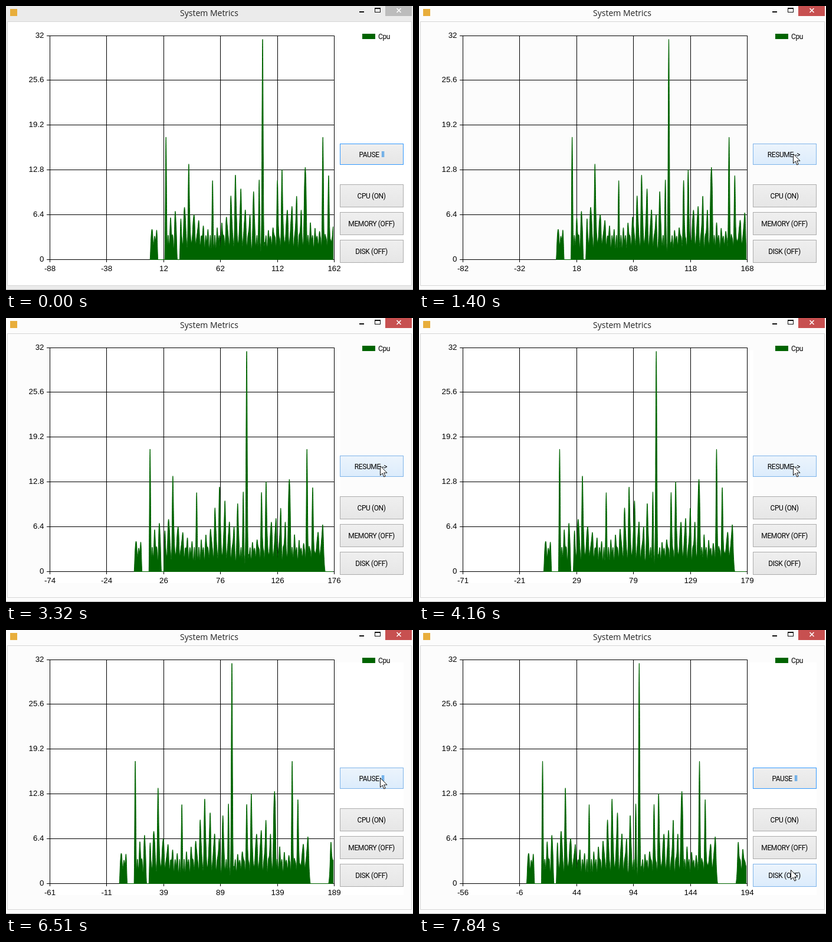
An HTML page for the animation above (7.99 s loop, 690x481 px).

```html
<!DOCTYPE html>
<html lang="en">
<head>
<meta charset="utf-8">
<title>System Metrics</title>
<style>
  html, body { margin: 0; width: 100%; height: 100%; overflow: hidden; background: #fcfcfc; }
  svg { display: block; width: 690px; height: 481px; }
  text { fill: #000; }
  .title { font: 14px "Open Sans", "Noto Sans", sans-serif; fill: #222; }
  .axis text { font: 13.3px "Liberation Sans", Arial, sans-serif; }
  .ui { font: 12px Roboto, "Liberation Sans", sans-serif; letter-spacing: -.4px; }
  .grid { stroke: #000; fill: none; shape-rendering: crispEdges; }
  rect { shape-rendering: crispEdges; }
</style>
</head>
<body>
<svg id="stage" viewBox="0 0 690 481">
  <defs>
    <linearGradient id="normal" x2="0" y2="1"><stop stop-color="#efefef"/><stop offset="1" stop-color="#e6e6e6"/></linearGradient>
    <linearGradient id="hover" x2="0" y2="1"><stop stop-color="#ecf4fc"/><stop offset="1" stop-color="#dcecfc"/></linearGradient>
    <linearGradient id="pressed" x2="0" y2="1"><stop stop-color="#daecfc"/><stop offset="1" stop-color="#c4e0fc"/></linearGradient>
    <clipPath id="plot"><rect x="74" y="50" width="483" height="380"/></clipPath>
  </defs>
</svg>
<script>
const LOOP = 7990;
const SPAN = 250, FIRST_MAX = 162, MAX_Y = 32;
const LEFT = 74.5, WIDTH = 482, TOP = 50.5, BASE = 429.5;
const UNIT = WIDTH / SPAN;

// The screen refreshes in steps; the chart gains a second every 1.78 steps
const stepAt = t => Math.floor((t + 20) / 138);
const secondsAt = t => Math.max(0, Math.ceil((stepAt(t) - .57) / 1.78));

// Load model: a regular beat with a slow swell, small blips halfway, and a few bursts
const BEAT = 4.1, PHASE = 1.7;
const BURSTS = [[14, 17.5], [34, 13.6], [55, 11.3], [71, 9], [75, 12], [80, 10],
  [91, 9.7], [96, 11.4], [99, 31.5], [112, 11.3], [116, 12.8], [129, 9],
  [136.5, 15], [152, 17.5], [157, 12]];
const QUIET = [[0, 0], [7, 13], [24, 26], [168, 184]];

const hump = (d, height, width) => height * (1 - (d / width) ** 2);
const fromBeat = x => (x - Math.round(x)) * BEAT;

function loadAt(s) {
  if (QUIET.some(([a, b]) => s >= a && s <= b)) return 0;
  const phase = (s - PHASE) / BEAT;
  const swell = 6 + 1.8 * Math.cos((s - 30) / 48 * 2 * Math.PI);
  return Math.max(1.2,
    hump(fromBeat(phase), swell, 1.4),
    hump(fromBeat(phase - .5), 3.5, 1.2),
    ...BURSTS.map(([at, height]) => hump(s - at, height, 1.1)));
}

const svg = document.getElementById("stage");

function set(el, attrs) {
  for (const k in attrs) el.setAttribute(k, attrs[k]);
}
function add(tag, attrs, parent = svg) {
  const el = document.createElementNS("http://www.w3.org/2000/svg", tag);
  set(el, attrs);
  parent.appendChild(el);
  return el;
}
function rect(x, y, width, height, fill, extra = {}) {
  return add("rect", { x, y, width, height, fill, ...extra });
}
function label(x, y, text, attrs = {}, parent = svg) {
  const el = add("text", { x, y, ...attrs }, parent);
  el.textContent = text;
  return el;
}

// Window
const frame = rect(0, 0, 690, 481, "#ebebeb");
const client = rect(2.5, 26.5, 685, 447, "#fff", { stroke: "#d6d6d6" });
rect(0, 480, 690, 1, "#b4b4b4");
rect(7, 5, 12, 12, "#e8ae3c");
label(344.5, 17, "System Metrics", { class: "title", "text-anchor": "middle" });
rect(599, 9, 8, 2, "#111");
rect(625.5, 3.5, 9, 7, "none", { stroke: "#111" });
rect(625, 3, 10, 2, "#111");
const closeBox = rect(643, 0, 45, 17, "#bcbcbc");
add("path", { d: "M662.5 4l7 7M669.5 4l-7 7", stroke: "#fff", "stroke-width": 1.6 });
const sheet = rect(74, 55, 493, 394, "#fff");

// Chart
const axis = add("g", { class: "axis" });
const xLabels = [];
let gridPath = "";
for (let i = 0; i <= 5; i++) {
  const x = Math.round(74 + i * WIDTH / 5) + .5;
  const y = Math.floor(TOP - .5 + i * (BASE - TOP) / 5) + .5;
  gridPath += `M${x} 50V434M69 ${y}H557`;
  const value = (MAX_Y * (5 - i) / 5).toFixed(1).replace(".0", "");
  label(64.5, y + 3.5, value, { "text-anchor": "end" }, axis);
  xLabels.push(label(x, 449, "", { "text-anchor": "middle" }, axis));
}
add("path", { d: gridPath, class: "grid" });
const area = add("path", { fill: "#006400", stroke: "#006400", "clip-path": "url(#plot)" });
rect(604, 47, 22, 9, "#006400");
label(631, 56, "Cpu", { class: "ui" });

// Smooth curve through one sample per second, closed along the baseline
function areaPath(max) {
  const last = max - 1;
  const px = s => LEFT + (s - max + SPAN) * UNIT;
  const ys = Array.from({ length: max }, (_, s) => BASE - loadAt(s) * (BASE - TOP) / MAX_Y);
  const slope = s => (ys[Math.min(s + 1, last)] - ys[Math.max(s - 1, 0)]) * .2;
  const reach = UNIT * .4;
  let d = `M${px(0)} ${BASE}V${ys[0]}`;
  for (let s = 1; s <= last; s++) {
    const a = px(s - 1), b = px(s);
    d += `C${a + reach} ${ys[s - 1] + slope(s - 1)} ${b - reach} ${ys[s] - slope(s)} ${b} ${ys[s]}`;
  }
  return d + `V${BASE}Z`;
}

// Buttons
function button(y, height, text) {
  const box = rect(566.5, y + .5, 107, height - 1, "url(#normal)");
  const caption = label(619.5, y + height / 2 + 4.5, text, { class: "ui", "text-anchor": "middle" });
  return { box, caption, holds: py => py >= y && py < y + height };
}
const toggle = button(233, 36, "");
const buttons = [toggle, button(302, 39, "CPU (ON)"),
  button(349, 39, "MEMORY (OFF)"), button(396, 39, "DISK (OFF)")];
const bars = add("path", { d: "M637.9 246V256M640.3 246V256", stroke: "#4f9fe6", "stroke-width": 1.7 });

const BORDERS = { normal: "#acacac", focused: "#3399ff", hover: "#7eb4ea", pressed: "#569de5" };
function paint({ box }, state) {
  const fill = state === "focused" ? "normal" : state;
  set(box, { fill: `url(#${fill})`, stroke: BORDERS[state] });
}

const cursor = add("path", {
  d: "M.5 .5V16.5L4.2 13L6.7 19L9.2 18L6.7 12.2H12Z", fill: "#fff", stroke: "#111"
});

const ENTER = 550, PRESS = 1270, RELEASE = 1400, PRESS_2 = 5550, RELEASE_2 = 5680;
const LEAVE_STEP = 51, MOVE_STEPS = 5;
const within = (t, a, b) => t >= a && t < b;
const show = (el, on) => set(el, { visibility: on ? "visible" : "hidden" });

function draw(t) {
  const max = FIRST_MAX + secondsAt(t);
  set(area, { d: areaPath(max) });
  xLabels.forEach((el, i) => { el.textContent = max - SPAN + i * 50; });

  const active = t >= PRESS;
  set(frame, { fill: active ? "#fcfcfc" : "#ebebeb" });
  set(client, { fill: active ? "#fcfcfc" : "#fff" });
  set(closeBox, { fill: active ? "#c75050" : "#bcbcbc" });
  set(sheet, { width: t >= PRESS_2 ? 600 : 493 });
  show(sheet, t >= 1650);

  const paused = within(t, RELEASE, RELEASE_2);
  toggle.caption.textContent = paused ? "RESUME ->" : "PAUSE";
  set(toggle.caption, { x: paused ? 618.5 : 615.5 });
  show(bars, !paused);

  // The pointer rests on the top button, then slides to the bottom one
  const slide = Math.min(1, Math.max(0, (stepAt(t) - LEAVE_STEP) / MOVE_STEPS));
  const x = 634 - 4 * slide, y = 250 + 156 * slide;
  const present = t >= ENTER;
  const down = within(t, PRESS, RELEASE) || within(t, PRESS_2, RELEASE_2);
  set(cursor, { transform: `translate(${x} ${y})` });
  show(cursor, present);
  for (const b of buttons) {
    if (present && b.holds(y)) paint(b, down ? "pressed" : "hover");
    else paint(b, b === toggle ? "focused" : "normal");
  }
}

const start = performance.now();
function tick() {
  draw((performance.now() - start) % LOOP);
  requestAnimationFrame(tick);
}
draw(0);
requestAnimationFrame(tick);
</script>
</body>
</html>
```
